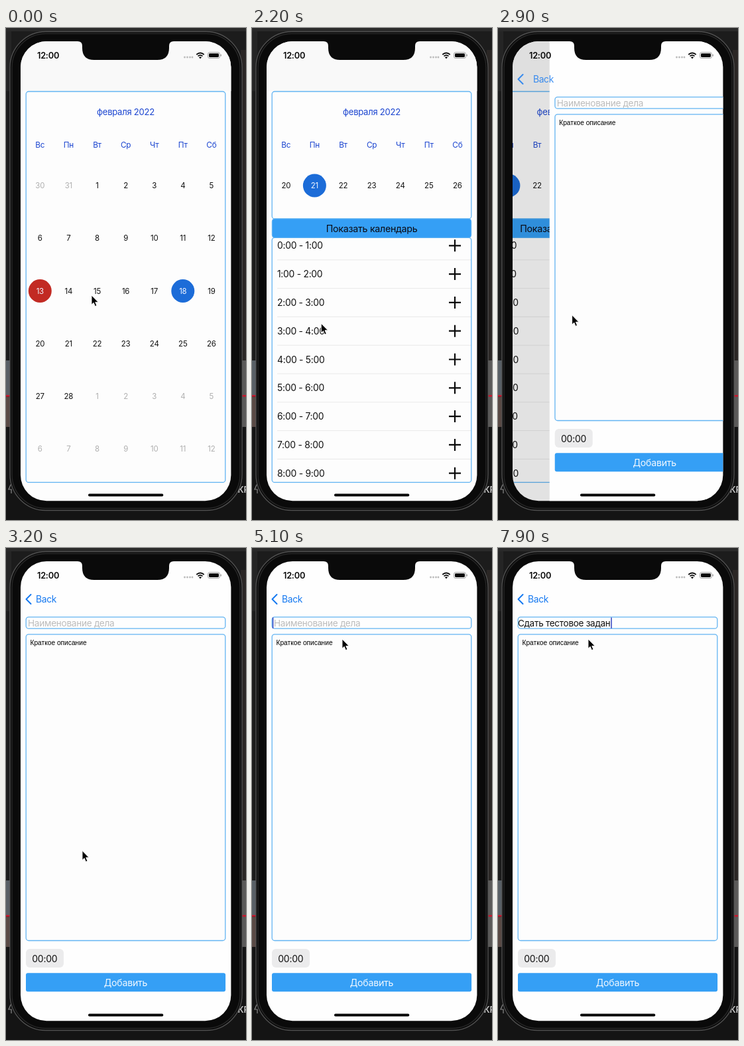
These frames come from a looping animation (362 by 740 pixels, 8 s). An HTML page:

```html
<!DOCTYPE html>
<html lang="ru">
<head>
<meta charset="utf-8">
<title>Календарь дел</title>
<style>
html, body { margin: 0; width: 100%; height: 100%; overflow: hidden; background: #191919; }
svg { display: block; width: 362px; height: 740px; }
text { font-family: Inter, Roboto, sans-serif; letter-spacing: -.02em; dominant-baseline: central; white-space: pre; }
</style>
</head>
<body>
<svg id="stage" viewBox="0 0 362 740"></svg>
<script>
const LOOP = 8000, STEP = 100;
const BLUE = '#359ff5', LINE = '#62b4f2', INK = '#1b45d0', RED = '#c22a23', PICK = '#1c6cd8';
const LEFT = 22, WIDTH = 317.4, TOP = 20, HEIGHT = 691.3;
const BOTTOM = 683.5, WEEK_BOTTOM = 287;
const stage = document.getElementById('stage');

const clamp = v => Math.min(1, Math.max(0, v));
const easeOut = v => 1 - (1 - clamp(v)) ** 3;
const smooth = v => (v = clamp(v), v * v * (3 - 2 * v));

const text = (s, x, y, size, fill = '#111', more = '') =>
  `<text x="${x}" y="${y}" font-size="${size}" fill="${fill}" ${more}>${s}</text>`;
const mid = (s, x, y, size, fill) => text(s, x, y, size, fill, 'text-anchor="middle"');
const box = (x, y, w, h, r, fill, more = '') =>
  `<rect x="${x}" y="${y}" width="${w}" height="${Math.max(0, h)}" rx="${r}" fill="${fill}" ${more}/>`;
const frame = (y, bottom, fill = 'none') =>
  box(30.2, y, 300.6, bottom - y, 4, fill, `stroke="${LINE}" stroke-width="1.3"`);
const clip = (id, y, bottom) =>
  `<clipPath id="${id}">${box(0, y, 362, bottom - y, 0, '#000')}</clipPath>`;
const path = (d, stroke, width, more = '') =>
  `<path d="${d}" fill="none" stroke="${stroke}" stroke-width="${width}" ${more}/>`;

// Pointer stops: time, x, y
const stops = [
  [0, 129, 402], [400, 92, 475.5], [1900, 92, 475.5], [2400, 111, 427.5],
  [2800, 111, 427.5], [3200, 115, 455.3], [3400, 115, 455.3], [4000, 138, 110],
  [4300, 138, 110], [4500, 136, 137]
];
const presses = [[600, 700], [2500, 2700], [4000, 4300]];

// Typed phrase and the time of each key
const phrase = 'Сдать тестовое задан';
const keys = [5600, 5700, 5800, 5900, 6000, 6100, 6300, 6400, 6500, 6700,
  6900, 7000, 7000, 7200, 7300, 7400, 7500, 7600, 7700, 7900];

function pointer(t) {
  const i = stops.findIndex(s => s[0] > t);
  if (i < 0) return stops[stops.length - 1].slice(1);
  const [t0, x0, y0] = stops[i - 1], [t1, x1, y1] = stops[i];
  const k = smooth((t - t0) / (t1 - t0));
  return [x0 + (x1 - x0) * k, y0 + (y1 - y0) * k];
}

function day(label, col, row, fill, disc) {
  const x = 51.3 + 43.1 * col, y = 237 + 79.25 * row;
  return (disc ? `<circle cx="${x}" cy="${y}" r="17.5" fill="${disc}"/>` : '') +
    mid(label, x, y, 11.5, disc ? '#f2f6ff' : fill);
}

function month(picked) {
  let out = '';
  for (let i = 0; i < 42; i++) {
    const n = i - 1, inside = n > 0 && n < 29;
    const label = n < 1 ? n + 31 : n > 28 ? n - 28 : n;
    const disc = !inside ? '' : n === picked ? PICK : n === 13 ? RED : '';
    out += day(label, i % 7, Math.floor(i / 7), inside ? '#111' : '#b0b0b0', disc);
  }
  return out;
}

function week() {
  let out = '';
  for (let i = 0; i < 7; i++) out += day(20 + i, i, 0, '#111', i === 1 ? PICK : '');
  return out;
}

function hours(top) {
  let out = '';
  for (let i = 0; i < 10; i++) {
    const y = top + 12 + 42.8 * i;
    out += text(`${i}:00 - ${i + 1}:00`, 38, y, 13.9) +
      path(`M297 ${y}h18M306 ${y - 9}v18`, '#0a0a0a', 2.2) +
      path(`M38 ${y + 21.5}H331`, '#e4e4e4', .8);
  }
  return out;
}

function calendarPage(t) {
  const k = easeOut((t - 700) / 458);
  const edge = BOTTOM + (WEEK_BOTTOM - BOTTOM) * k, top = edge + 28.3;
  const names = ['Вс', 'Пн', 'Вт', 'Ср', 'Чт', 'Пт', 'Сб'];
  const fade = 1 - clamp((t - 700) / 250);
  return clip('days', 96, edge) + clip('list', top, BOTTOM) + clip('body', 90, BOTTOM + .7) +
    box(-60, 20, 460, 700, 0, '#fdfdfd') + box(-60, 20, 460, 75, 0, '#f9f9f9') +
    `<g clip-path="url(#body)">` + frame(95.5, edge, '#fdfdfd') +
    mid('февраля 2022', 180.5, 126, 13.05, INK) +
    names.map((s, i) => mid(s, 51.3 + 43.1 * i, 175.5, 11.8, INK)).join('') +
    `<g clip-path="url(#days)">` +
    (fade ? `<g opacity="${fade}" transform="translate(0 ${-238 * k})">${month(t < 700 ? 18 : 21)}</g>` : '') +
    `<g opacity="${clamp((t - 1050) / 200)}">${week()}</g></g>` +
    (k ? `<g clip-path="url(#list)">${hours(top)}</g>` + frame(top, Math.max(top, BOTTOM)) +
      box(30.2, edge, 300.6, 28.3, 4, BLUE, `stroke="${LINE}" stroke-width=".7"`) +
      mid('Показать календарь', 180.6, edge + 14.1, 14.25, '#0b0b14') : '') + '</g>';
}

function taskPage(t) {
  const typed = phrase.slice(0, keys.filter(k => k <= t).length);
  const blink = typed ? 1 : t < 4800 ? 0 : clamp(.5 + .8 * Math.sin((t - 4800) / 1000 * 2 * Math.PI));
  return box(LEFT, 20, 340, 700, 0, '#fefefe') +
    frame(103.8, 121.2, '#fefefe') + frame(129.8, 590.5, '#fdfdfd') +
    (typed ? '' : text('Наименование дела', 33, 113, 13.6, '#bcbcbc')) +
    text(typed, 30, 113, 13.5, '#111', 'id="typed"') +
    `<rect id="caret" y="104.5" width="1.6" height="16.5" fill="#3f4fc4" opacity="${blink}"/>` +
    text('Краткое описание', 36.5, 142, 10.2, '#000', `style="font-family:'Liberation Sans',sans-serif;letter-spacing:0"`) +
    box(30, 603, 57, 28, 6, '#ebebec') + mid('00:00', 58.3, 617.3, 14) +
    box(30, 639.3, 301.1, 28, 3, BLUE) + mid('Добавить', 180.5, 653.3, 14.2, '#f1f8ff');
}

function backdrop() {
  return box(0, 0, 362, 740, 0, '#1c1c1c') + box(0, 0, 362, 5, 0, '#2a2a2a') +
    box(0, 5, 8, 90, 0, '#252525') + box(354, 33, 8, 467, 0, '#2b2725') +
    box(0, 500, 8, 52, 0, '#596066') + box(0, 555, 8, 45, 0, '#594a45') +
    box(354, 500, 8, 100, 0, '#5b5a59') + box(0, 600, 362, 140, 0, '#141414') +
    box(0, 552, 362, 2.6, 0, '#c5182e') +
    text('КР', 349.5, 693.5, 13, '#c4c4c4', 'font-weight="600"') +
    path('M12 687H7l-3 7h4v6', '#8a8a8a', 1.2);
}

function phone() {
  return box(6, 5.5, 350, 720, 54, '#0a0a0a', 'stroke="#505050" stroke-width="1.4"') +
    box(9, 8.5, 344, 714, 51, 'none', 'stroke="#262626" stroke-width="1.5"');
}

function statusBar() {
  const dots = [269.5, 273.5, 277.5, 281].map(x => `<circle cx="${x}" cy="44" r="1.4" fill="#bbb"/>`).join('');
  return '<path d="M108 18v2q7 0 7 7v3q0 18 18 18h95q18 0 18-18v-3q0-7 7-7v-2z" fill="#0a0a0a"/>' +
    text('12:00', 47, 41, 12.8, '#0a0a0a', 'font-weight="600"') + dots +
    path('M287.3 40q5.7-5 11.4 0M289.5 42.4q3.5-3 7 0', '#0a0a0a', 1.8) +
    '<path d="M290.9 44q2.1-1.6 4.2 0l-2.1 2.2z" fill="#0a0a0a"/>' +
    box(304.5, 36.7, 18, 8.8, 2.6, 'none', 'stroke="#999" stroke-width=".9"') +
    box(306, 38.2, 15, 5.8, 1.4, '#0a0a0a') + box(323.6, 39.6, 1.3, 3, .6, '#999') +
    box(124, 700.6, 113.3, 3.9, 1.9, '#080808');
}

function draw(t) {
  const p = easeOut((t - 2680) / 500), [x, y] = pointer(t);
  const pressed = presses.some(([a, b]) => t >= a && t < b);
  stage.innerHTML = backdrop() + phone() +
    `<clipPath id="screen">${box(LEFT, TOP, WIDTH, HEIGHT, 39, '#000')}</clipPath>` +
    `<g clip-path="url(#screen)">` +
    (p < 1 ? `<g transform="translate(${-.3 * WIDTH * p} 0)">${calendarPage(t)}</g>` +
      box(LEFT, TOP, WIDTH, HEIGHT, 0, '#000', `opacity="${.13 * p}"`) : '') +
    (p > 0 ? `<g transform="translate(${WIDTH * (1 - p)} 0)">${taskPage(t)}</g>` +
      `<g opacity="${p}">` + path('M37.5 70l-7 7 7 7', '#1478f0', 2, 'stroke-linecap="round" stroke-linejoin="round"') +
      text('Back', 45 + 45 * (1 - p), 77, 13.8, '#1478f0') + '</g>' : '') +
    '</g>' + statusBar() +
    (pressed ? `<circle cx="${x - .5}" cy="${y + 2}" r="21.5" fill="none" stroke="#0a0a0a" stroke-width="1.6"/>` : '') +
    `<path transform="translate(${x} ${y})" d="M0 0V14.2L3.2 11.3 5.4 16.6 7.9 15.5 5.7 10.4H10.2Z" fill="#000" stroke="#fff" stroke-width=".9"/>`;
  const typed = document.getElementById('typed');
  if (typed) {
    const width = typed.textContent ? typed.getComputedTextLength() : 0;
    document.getElementById('caret').setAttribute('x', 30.8 + width);
  }
}

let shown = -1;
function tick() {
  const t = Math.floor(performance.now() % LOOP / STEP) * STEP;
  if (t !== shown) draw(shown = t);
  requestAnimationFrame(tick);
}
tick();
</script>
</body>
</html>
```
